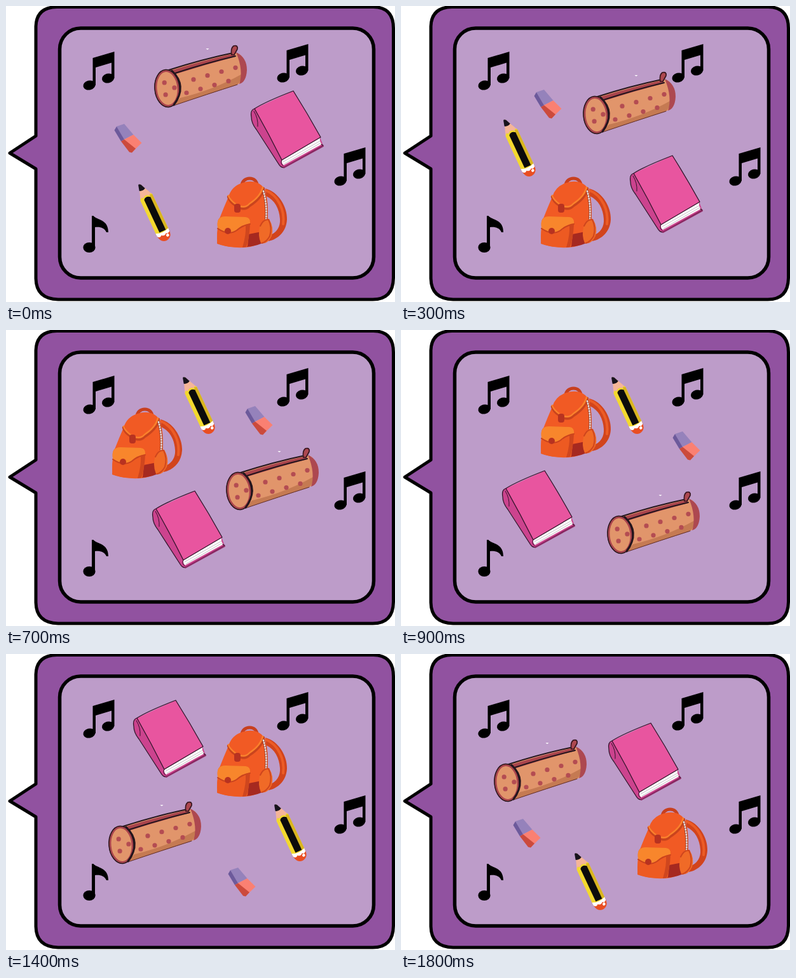
Recreate the animation shown at these times as an HTML page. Size 612x467 px, loop 1900 ms.

```html
<!DOCTYPE html>
<html lang="en">
<head>
<meta charset="utf-8">
<title>School things</title>
<style>
html, body { margin: 0; width: 100%; height: 100%; overflow: hidden; background: #fff; }
svg { display: block; width: 612px; height: 467px; }
</style>
</head>
<body>
<svg viewBox="0 0 612 467" stroke-linejoin="round" stroke-linecap="round">
  <defs>
    <g id="pair">
      <ellipse cx="131" cy="125" rx="9.7" ry="7.4" transform="rotate(-14 131 125)"/>
      <ellipse cx="160.5" cy="114" rx="9.7" ry="7.4" transform="rotate(-14 160.5 114)"/>
      <path d="M136.5 82 L170.5 72 V114 H166 V89.5 L141 97 V125 H136.5 Z"/>
    </g>
  </defs>

  <path d="M80 1.5 H578 Q609.5 2 609.5 35 V429 Q609 463 577 463 H82 Q47.5 462 47 430 V257 L6 232 L47 205 V32 Q48 2 80 1.5 Z" fill="#9152a0" stroke="#000" stroke-width="5"/>
  <rect x="84.5" y="35" width="494" height="394" rx="33" fill="#bd9cc9" stroke="#000" stroke-width="5.5"/>

  <use href="#pair"/>
  <use href="#pair" x="305" y="-12"/>
  <use href="#pair" x="395" y="151"/>
  <ellipse cx="131" cy="381" rx="9.6" ry="8"/>
  <path d="M135 331 H137.5 C143 338 161 336 161 357 H158 C155 350 148 348 140 349 V381 H135 Z"/>

  <g id="eraser">
    <path d="M174 190 L186 186 L200.5 203 L186 210.5 Z" fill="#9582bb"/>
    <path d="M174 190 L170.5 196 L181 213.5 L186 210.5 Z" fill="#6c5a9b"/>
    <path d="M186 210.5 L200.5 203 L213.5 216 L198 231 Z" fill="#fa8072"/>
    <path d="M186 210.5 L181 213.5 L194 230.5 L198 231.5 L204 225 Z" fill="#cb4a3c"/>
  </g>

  <g id="pencil">
    <g transform="translate(209.5 282) rotate(-25)">
      <path d="M-9 24 Q-6 18 -3 22 Q2 17 8 22 Q10 17 12.5 22 V84 H-9 Z" fill="#f3d92f"/>
      <path d="M8 21 L12.5 22 V84 H8 Z" fill="#d9b51f"/>
      <path d="M0 0 L-9 24 Q-6 18 -3 22 Q2 17 8 22 Q10 17 12.5 22 L2 0 Z" fill="#f5b598"/>
      <path d="M-1.500 0 Q0 -2 2.500 1 L6 9 Q1 12 -4 9 Z" fill="#17131c"/>
      <path d="M-3 25 Q2 20 8 25 V82 H-3 Z" fill="#0b0b0b"/>
      <path d="M-9 84 Q-8 98 2 98 Q13 97 12.500 84 Z" fill="#e94e22"/>
      <path d="M-9 81 Q2 86 12.500 81 V86 Q9 90 6 87 Q2 91 -2 87 Q-6 91 -9 86 Z" fill="#fff"/>
      <circle cx="7" cy="91" r="2.3" fill="#fff"/>
    </g>
  </g>

  <g id="pack">
    <path d="M371 284 C371 268 396 268 395 284" fill="none" stroke="#c8401f" stroke-width="5"/>
    <path d="M408 288 C429 293 443 318 442 337 C441 356 428 368 413 371 L414 362 C426 358 432 348 431 336 C430 320 423 306 409 300 Z" fill="#d2441c"/>
    <path d="M409 291 C428 299 439 322 436 344" fill="none" stroke="#ec5c26" stroke-width="4"/>
    <path d="M350 301 Q355 284 372 279 Q390 273 402 283 Q411 292 412 320 L412 367 Q399 377 384 380 Q358 384 333 375 Q330 360 336 335 Q343 317 350 301 Z" fill="#f15a24"/>
    <path d="M382 360 L402 356 L411 370 Q399 378 379 380 Z" fill="#a62920"/>
    <path d="M350 301 Q352 309 362 315 Q375 324 383 315 Q402 303 405 288" fill="none" stroke="#c9441d" stroke-width="4.500"/>
    <path d="M350 299 Q352 306 362 313 Q375 321 383 312 Q401 300 404 286" fill="none" stroke="#fa812c" stroke-width="2.500"/>
    <path d="M405 292 Q411 313 409 338" fill="none" stroke="#a5442a" stroke-width="4"/>
    <path d="M405 292 Q411 313 409 338" fill="none" stroke="#e9dfe0" stroke-width="2.500" stroke-dasharray="1 3"/>
    <path d="M333 348 Q331 331 345 332 L379 333 Q386 335 384 345 L380 379 Q352 383 332 375 Z" fill="#ed5a22"/>
    <path d="M333 350 Q330 331 346 332 L377 333 Q385 334 384 343 Q371 345 363 353 Q350 362 333 350 Z" fill="#f8862c"/>
    <path d="M333 351 Q350 363 363 354 Q372 346 384 344" fill="none" stroke="#c9441d" stroke-width="2"/>
    <path d="M384 344 Q383 366 378 380 L372 381 Q378 361 377 346 Z" fill="#cf461e"/>
    <path d="M399 349 Q404 334 414 336 Q422 350 418 363 Q411 377 401 374 Q396 362 399 349 Z" fill="#f06a27"/>
    <path d="M400 347 Q405 336 413 337 Q419 349 415 363 Q410 372 403 374" fill="none" stroke="#cf461e" stroke-width="2"/>
    <rect x="359" y="312" width="10" height="14" rx="4" fill="#b83220"/>
    <circle cx="349" cy="355" r="5" fill="#b83220"/>
  </g>

  <g id="book">
    <path d="M391 162 Q384 164 386 174 Q386 184 394 194 L430 251 Q434 256 438 254 L499 220 L494 207 L434 242 Z" fill="#cc438e"/>
    <path d="M434 243 L494 208 Q493 214 497 218 L437 251 Q433 248 434 243 Z" fill="#fff"/>
    <path d="M436 246 L494 213 M438 249 L495 216" fill="none" stroke="#aaa0a8" stroke-width=".7"/>
    <path d="M391 162 L452 134 L495 207 L434 243 Z" fill="#e8559f"/>
    <path d="M391 162 Q408 151 452 134 Q474 169 495 207 Q463 226 434 243 Q413 201 391 162 Q384 164 386 175 Q386 185 394 195 L430 251 Q434 257 440 253 L499 220 L496 218" fill="none" stroke="#32132a" stroke-width="1.300"/>
    <path d="M390 166 Q397 177 396 190 M434 243 Q431 248 436 252" fill="none" stroke="#32132a"/>
    <path d="M437 255 L499 221" stroke="#8e2864" stroke-width="2"/>
  </g>

  <g id="case">
    <path d="M254 101 L357 74 Q374 72 378 99 Q379 118 364 124 L261 158 Z" fill="#e1956b"/>
    <path d="M274 145 Q325 133 370 108 Q371 120 362 125 L263 157 Z" fill="#c57a52"/>
    <path d="M362 73 Q379 81 379 101 Q378 120 367 123 Q374 102 362 73 Z" fill="#ad4850"/>
    <path d="M259 102 Q310 86 359 75 L361 80 Q315 92 268 107 Z" fill="#a9444c"/>
    <path d="M256 101 Q309 84 357 74 M266 106 Q315 90 361 79" fill="none" stroke="#24151d" stroke-width="2"/>
    <path d="M355 77 Q353 67 358 63 Q365 61 364 68 L359 77 Z" fill="#ad4850" stroke="#38161f" stroke-width="1.700"/>
    <path d="M264 157 Q317 139 364 124" fill="none" stroke="#5c2c2c"/>
    <ellipse cx="253.500" cy="130" rx="18" ry="28" transform="rotate(-5 253.500 130)" fill="#e1956b" stroke="#a9444c" stroke-width="4"/>
    <ellipse cx="253.500" cy="130" rx="19.500" ry="29.500" transform="rotate(-5 253.500 130)" fill="none" stroke="#24151d" stroke-width="1.500"/>
    <path d="M261 102 Q286 126 264 156" fill="none" stroke="#24151d" stroke-width="3"/>
    <g id="dots" fill="#b44c52"/>
    <path d="M314.500 67 H319.500 L317 69 Z" fill="#fff"/>
  </g>
</svg>
<script>
const STEP = 100, STEPS = 19, TURN = 2 * Math.PI;
const HUB = { x: 320, y: 225 };
const BULGE = 0.04;
const $ = id => document.getElementById(id);

// Three dots on the round end, a zigzag along the side
const dot = (x, y) => `<circle cx="${x}" cy="${y}" r="3.6"/>`;
let dots = '';
for (let i = 0; i < 3; i++) dots += dot(254.5 + 10.5 * Math.cos(i * 2 - 2.1), 130 + 10.5 * Math.sin(i * 2 - 2.1));
for (let i = 0; i < 8; i++) dots += dot(284 + 11 * i, 137 - 3.1 * i - 18 * (i % 2));
$('dots').innerHTML = dots;

// Everything circles the hub clockwise through a few key points at shared steps
const times = [0, 3, 7, 9, 12, 14, 18];
const routes = {
  case: '306,110 359,152 419,234 397,303 279,328 234,281 219,183',
  book: '441,194 416,296 286,314 215,282 197,193 256,133 382,169',
  pack: '387,326 275,326 222,179 275,146 335,116 387,170 427,299',
  pencil: '235,328 188,226 305,121 358,121 432,209 449,284 300,361',
  eraser: '192,209 231,155 398,143 449,183 405,305 371,360 198,283'
};

const items = Object.entries(routes).map(([id, route]) => {
  const points = route.split(' ').map(p => p.split(',').map(Number));
  const keys = points.map(([x, y]) => ({
    angle: Math.atan2(y - HUB.y, x - HUB.x),
    radius: Math.hypot(x - HUB.x, y - HUB.y)
  }));
  return { node: $(id), home: points[0], keys };
});

// Arc between two keys, swinging wider the longer the gap
function place(keys, t) {
  const i = Math.max(0, times.findIndex(end => end >= t) - 1);
  const from = times[i], to = times[i + 1], a = keys[i], b = keys[i + 1];
  const u = (t - from) / (to - from);
  const sweep = (b.angle - a.angle + TURN) % TURN;
  const angle = a.angle + sweep * u;
  const radius = (a.radius + (b.radius - a.radius) * u) * (1 + BULGE * (t - from) * (to - t));
  return [HUB.x + radius * Math.cos(angle), HUB.y + radius * Math.sin(angle)];
}

function draw(ms) {
  const t = Math.floor(ms / STEP) % STEPS;
  for (const { node, home, keys } of items) {
    const [x, y] = place(keys, t);
    node.setAttribute('transform', `translate(${Math.round(x - home[0])} ${Math.round(y - home[1])})`);
  }
}

const start = performance.now();
function tick() {
  draw(performance.now() - start);
  requestAnimationFrame(tick);
}
tick();
</script>
</body>
</html>
```
